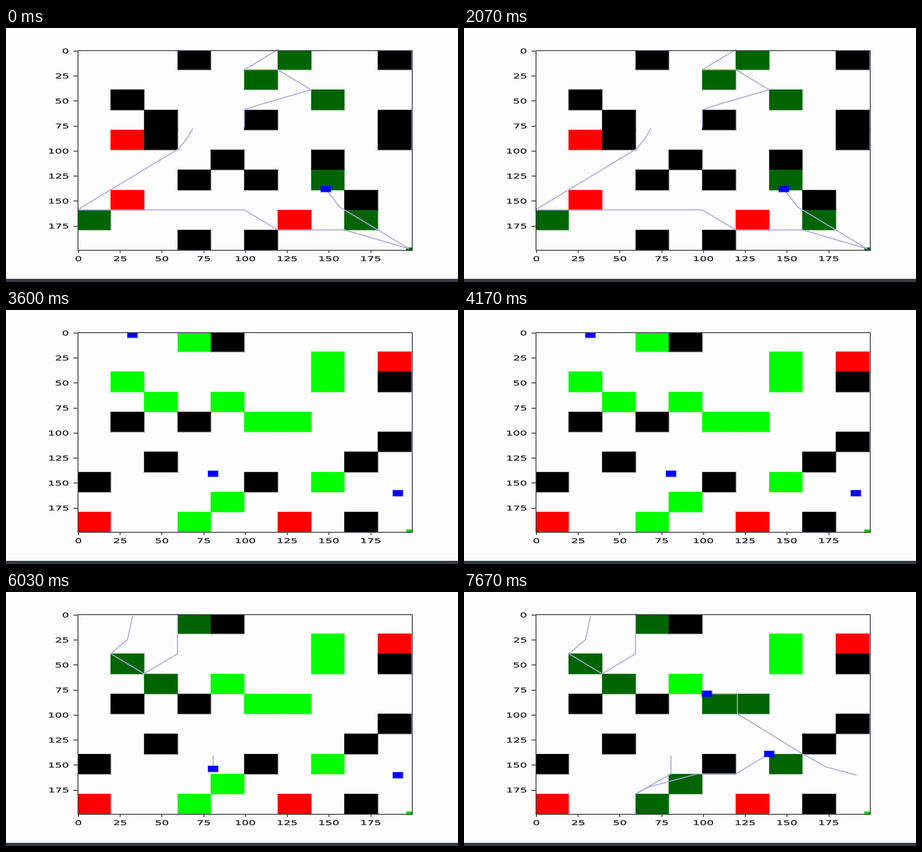
Animation, 998 px wide and 561 px high, one loop 8 s. Source, as a matplotlib script:

```python
import matplotlib.pyplot as plt
from matplotlib.animation import FuncAnimation
from matplotlib.patches import PathPatch, Rectangle
from matplotlib.textpath import TextPath
from matplotlib.transforms import Affine2D

W, H, DPI = 998, 561, 100
LOOP, STEP = 8000, 40
LEFT, RIGHT, TOP, BOTTOM = 159, 897, 50, 490.5
SX, SY = 3.69, 2.21          # pixels per data unit
CELL_W, CELL_H = 73.75, 44.25
PAPER, INK, PATH, BLUE = "#fdfdfd", "#3c3c46", "#a9a9da", "#0000ff"
LIME, GREEN = "#00ff00", "#006400"
TILES = {"#": "#000000", "x": "#ff0000", "o": LIME}

# walls '#', hazards 'x', items 'o'
OLD_MAP = """
...#..o..#
.....o....
.#.....o..
..#..#...#
.x#......#
....#..#..
...#.#.o..
.x......#.
o.....x.o.
...#.#....""".split()
NEW_MAP = """
...o#.....
.......o.x
.o.....o.#
..o.o.....
.#.#.oo...
.........#
..#.....#.
#....#.o..
....o.....
x..o..x.#.""".split()

# routes in grid units (column, row)
GOAL = (9.92, 9.93)
OLD_ROUTES = [
    [(3.45, 3.95), (3.3, 4.4), (3.03, 4.95), (0, 8), (5, 8), (6, 9), (8, 9), GOAL],
    [(5, 3.85), (5, 3), (5.55, 2.7), (7, 2), (6, 1), (5, 1), (6, 0)],
    [GOAL, (9, 9), (8, 8), (7.85, 7.85), (7.44, 6.95)],
]
NEW_ROUTES = [
    [(1.65, 0.15), (1.5, 1.3), (1, 2), (2, 3), (3, 2), (3, 0)],
    [(4.06, 7.1), (4.06, 7.75), (4.06, 8), (3, 9), (3.4, 8.65), (4.85, 8), (6, 8), (7, 7)],
    [(9.6, 8.05), (8.7, 7.65), (8, 7), (6.05, 5), (6.05, 4), (5.13, 4)],
]

# start time, map, routes, points passed on each route
STAGES = [
    (0, OLD_MAP, OLD_ROUTES, (8, 7, 5)),
    (3600, NEW_MAP, NEW_ROUTES, (1, 1, 1)),
    (4200, NEW_MAP, NEW_ROUTES, (6, 2, 1)),
    (6800, NEW_MAP, NEW_ROUTES, (6, 8, 6)),
]

fig = plt.figure(figsize=(W / DPI, H / DPI), dpi=DPI, facecolor=PAPER)
ax = fig.add_axes([0, 0, 1, 1])
ax.set(xlim=(0, W), ylim=(H, 0))
ax.axis("off")


def px(n):
    return n * 72 / DPI


def at(col, row):
    return 157.5 + CELL_W * col, 47.8 + CELL_H * row


def box(x, y, w, h, color, z=1):
    """Filled box with a soft rim, cut at the plot frame."""
    x0, x1 = max(x, LEFT), min(x + w, RIGHT)
    y0, y1 = max(y, TOP), min(y + h, BOTTOM)
    size = (x0, y0), x1 - x0, y1 - y0
    rim = Rectangle(*size, fill=False, ec=color, lw=px(2.8), alpha=0.3, zorder=z - 0.1)
    return [ax.add_patch(Rectangle(*size, fc=color, lw=0, zorder=z)), ax.add_patch(rim)]


def robot(point):
    x, y = at(*point)
    return box(x - 11, y - 6.5, 22, 13, BLUE, z=4)


def route(points):
    return ax.plot(*zip(*(at(*p) for p in points)), color=PATH, lw=px(2.5),
                   alpha=0.9, zorder=3, solid_joinstyle="round")


def label(text, x, y, align):
    """Tick label sharing the plot's horizontal stretch."""
    glyphs = TextPath((0, 0), text, size=14.6)
    b = glyphs.get_extents()
    anchor = b.x1 if align == "right" else (b.x0 + b.x1) / 2
    move = (Affine2D().translate(-anchor, -(b.y0 + b.y1) / 2)
            .scale(SX / SY, -1).translate(x, y))
    ax.add_patch(PathPatch(move.transform_path(glyphs), fc="#262626", ec="#262626",
                           lw=px(0.5), zorder=6))


def line(xs, ys):
    ax.plot(xs, ys, color=INK, lw=px(1.9), zorder=5, solid_capstyle="butt")


def draw_frame():
    line([LEFT, RIGHT, RIGHT, LEFT, LEFT], [TOP, TOP, BOTTOM, BOTTOM, TOP])
    for v in range(0, 200, 25):
        x, y = LEFT + 0.8 + SX * v, TOP + 0.8 + SY * v
        line([x, x], [BOTTOM, BOTTOM + 6])
        line([LEFT - 10, LEFT], [y, y])
        label(str(v), x, 509.5, "center")
        label(str(v), 137.5, y, "right")
    ax.add_patch(Rectangle((0, 553.5), W, H - 553.5, fc="#353b45", lw=0))


def draw_map(rows, visited):
    """Items darken once a route has touched their cell."""
    parts = []
    for r, row in enumerate(rows):
        for c, tile in enumerate(row):
            if tile in TILES:
                found = tile == "o" and (c, r) in visited
                parts += box(*at(c, r), CELL_W, CELL_H, GREEN if found else TILES[tile])
    goal = GREEN if (9, 9) in visited else "#10d010"
    return parts + box(884, 485, 22, 13, goal, z=2)


def scene(t):
    _, rows, routes, passed = [s for s in STAGES if s[0] <= t][-1]
    trails = [pts[:n] for pts, n in zip(routes, passed)]
    visited = {(int(c), int(r)) for trail in trails for c, r in trail}
    parts = draw_map(rows, visited)
    for trail in trails:
        if len(trail) > 1:
            parts += route(trail)
        # a robot leaves the board at its top edge or at the goal
        if trail[-1][1] > 0 and trail[-1] != GOAL:
            parts += robot(trail[-1])
    return parts


shown = []


def update(i):
    while shown:
        shown.pop().remove()
    shown.extend(scene(i * STEP))
    return shown


draw_frame()
anim = FuncAnimation(fig, update, frames=LOOP // STEP, interval=STEP,
                     repeat=True, repeat_delay=0, init_func=lambda: update(0))
plt.show()
```
